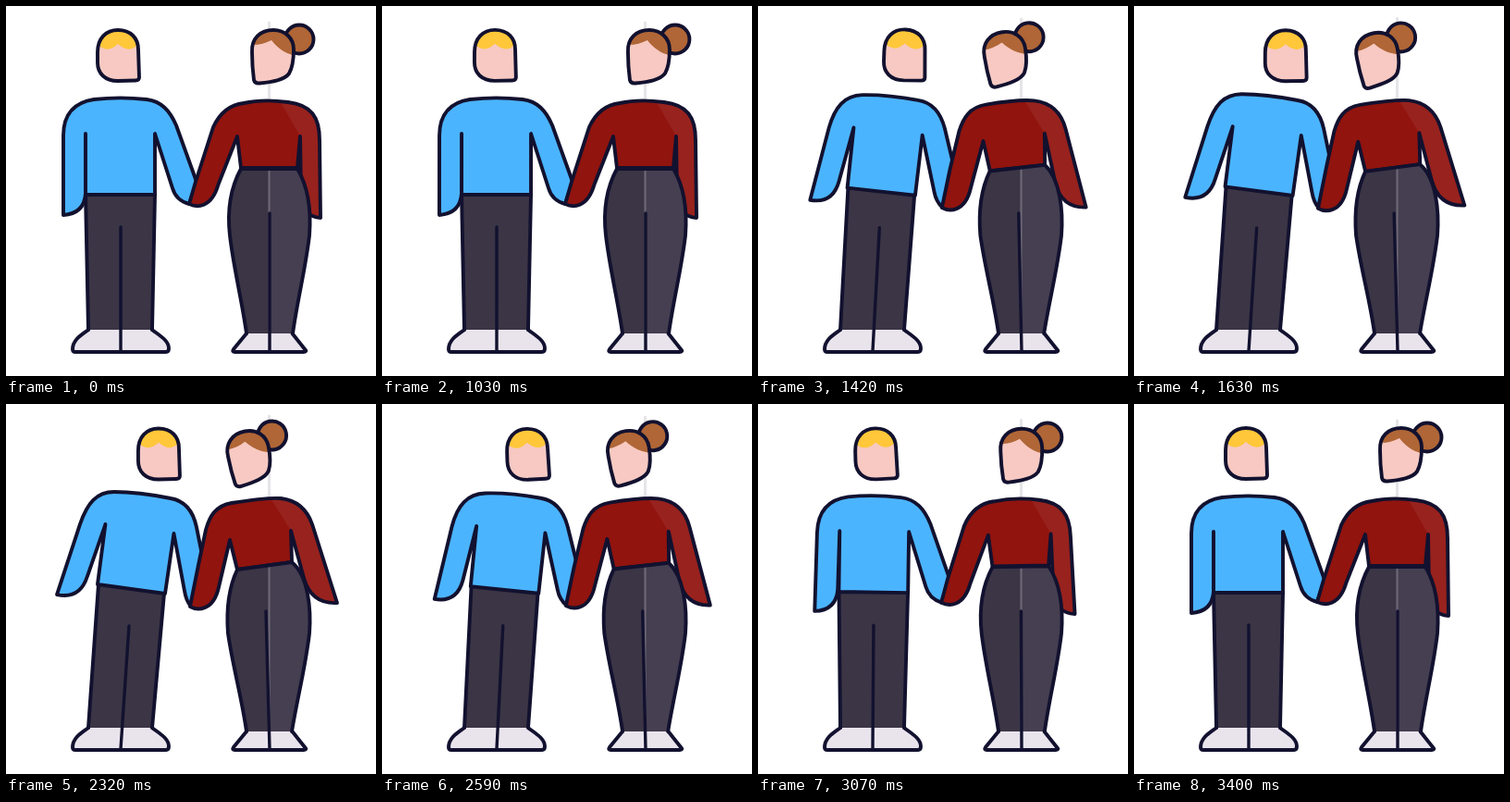
An HTML page with a canvas that plays this animation: 400 by 400 pixels, repeating every 3.43 s.

```html
<!DOCTYPE html>
<html>
<head>
<meta charset="utf-8">
<style>
html, body { margin: 0; width: 100%; height: 100%; overflow: hidden; background: #fff; }
canvas { display: block; width: 100vmin; height: 100vmin; }
</style>
</head>
<body>
<canvas id="stage"></canvas>
<script>
const LOOP = 3430, LEAN = [1000, 1860], BACK = [2290, 3400];
const INK = '#12112f', SHOE = '#e9e4ec', SKIN = '#f7c9c2', BROWN = '#b06636';
const PANTS = '#3b3545', PANTS_LIT = '#453f51';
const OUTLINE = 3.9, SEAM = 3.4;

const canvas = document.getElementById('stage');
const ctx = canvas.getContext('2d');

// Each pair holds the upright and the leaning version of a shape.
const man = {
  pants: ['M86,204 L89,350 L158,350 L161,204',
          'M100,195 L89,350 L158,350 L171,205'],
  seam: ['M124,239 L124,373', 'M133,240 L124,373'],
  top: ['M62,226 L62,140 C62,116 75,104 95,101 C113,99 134,99 152,101 C168,103 177,113 184,129 L206,190 L198,214 C190,212 183,207 180,197 L161,138 L161,204 L86,204 L86,138 L86,203 C85,217 77,225 62,226 Z',
        'M55,206 L80,130 C88,107 98,95 117,95 C137,95 158,98 178,102 C196,105 203,119 206,133 L215,178 L200,219 C196,214 194,209 193,202 L181.5,140 L172,205 L99,195 L107.5,130 L88,186 C83,202 73,210 55,206 Z'],
  shoes: 'M89,350 C84,354 72,360 72,371 Q72,374 75,374 L173,374 Q176,374 176,370 C176,361 164,355 158,350',
  head: 'M99,50 C99,35 108,26 121,26 C135,26 143,35 143,47 L144,77 Q144,80.5 140,80.5 L121,81 C107,81 99,73 99,61 Z',
  hair: 'M99,41 C101,32 109,26 121,26 C134,26 142,34 143,41 C137,48 130,49 121,41 C113,49 105,48 99,41 Z'
};

const woman = {
  pants: ['M254,176 C242,198 239,222 242,248 C246,283 255,318 260,354 L310,354 C315,318 324,283 328,248 C330,222 327,196 315,176 Z',
          'M250,179 C240,200 238,222 240,248 C245,283 255,318 260,354 L309,354 C315,318 324,283 328,248 C330,222 327,186 309,171 Z'],
  lit: ['M285,176 L285,354 L310,354 C315,318 324,283 328,248 C330,222 327,196 315,176 Z',
        'M285,175 L285,354 L309,354 C315,318 324,283 328,248 C330,222 327,186 309,171 Z'],
  seam: ['M285,224 L285,373', 'M281,224 L285,373'],
  guide: ['M284.5,18 L284.5,104', 'M284.5,13 L284.5,104'],
  top: ['M198,214 C206,218 222,219 229.5,193 L250,141 L254,175 L315,175 L318,141 L319,206 C321,221 327,228 340,229 L339,145 C339,120 330,107 305,104 C290,102 270,102 257,105 C240,107 230,118 224,131 L205,190 Z',
        'M199,219 C206,223 224,225 230,198 L242,147 L250,179 L309,171 L308,137 L322,188 C327,206 338,216 358,215 L331,130 C325,113 314,104 297,102 C283,101 263,104 244,107 C226,110 220,122 216,136 L208,174 Z'],
  sleeve: ['M297,104 L318,141 L319,206 C321,221 327,228 340,229 L339,145 C339,120 330,107 305,104 Z',
           'M286,102 L308,137 L322,188 C327,206 338,216 358,215 L331,130 C325,113 314,104 297,102 Z'],
  shoes: 'M260,354 L246,371 Q244,374 247,374 L322,374 Q326,374 323,371 L309.5,354',
  head: 'M266,50 C265,35 275,26 289,26 C302,26 311,35 311,47 C311,58 310,66 306,73 C301,80 288,82 274,83.5 Q269,84 268,80 Q266,65 266,50 Z',
  hair: 'M267,42 C270,31 278,26 289,26 C302,26 311,35 311,47 L310,53 C302,51 294,46 287,37 C281,40 274,42 267,42 Z',
  bun: 'M332.5,36 A15.5,15.5 0 1 1 301.5,36 A15.5,15.5 0 1 1 332.5,36 Z'
};

const NUM = /-?\d+(\.\d+)?/g;

function morph([from, to], k) {
  const ends = to.match(NUM);
  let i = 0;
  return from.replace(NUM, n => +n + (ends[i++] - n) * k);
}

function fill(d, color) {
  ctx.fillStyle = color;
  ctx.fill(new Path2D(d));
}

function line(d, color = INK, width = OUTLINE) {
  ctx.strokeStyle = color;
  ctx.lineWidth = width;
  ctx.stroke(new Path2D(d));
}

function shape(d, color) {
  fill(d, color);
  line(d);
}

function bezier(x1, y1, x2, y2) {
  const at = (a, b, s) => 3 * (1 - s) * (1 - s) * s * a + 3 * (1 - s) * s * s * b + s * s * s;
  return u => {
    if (u <= 0 || u >= 1) return u <= 0 ? 0 : 1;
    let lo = 0, hi = 1;
    for (let i = 0; i < 24; i++) {
      const mid = (lo + hi) / 2;
      if (at(x1, x2, mid) < u) lo = mid; else hi = mid;
    }
    return at(y1, y2, lo);
  };
}

const leanBody = bezier(.4, 0, .1, 1), leanHead = bezier(.5, .3, .1, 1);
const backMan = bezier(.33, 0, .42, 1), backSoft = bezier(.4, 0, .5, 1);

// Draws around pivot (x, y), moved by (dx, dy) and turned by deg.
function posed(x, y, dx, dy, deg, paint) {
  ctx.save();
  ctx.translate(x + dx, y + dy);
  ctx.rotate(deg * Math.PI / 180);
  ctx.translate(-x, -y);
  paint();
  ctx.restore();
}

function drawMan(k, head, leaning) {
  const pants = morph(man.pants, k);
  fill(pants, PANTS);
  fill(man.shoes, SHOE);
  line(pants.replace(/ L158,350/, ' M158,350'));
  line(man.shoes);
  line(morph(man.seam, k), INK, SEAM);
  shape(morph(man.top, k), '#4bb4ff');

  const swing = Math.sin(Math.PI * head);
  const bob = head * .5 + swing * (leaning ? -2.2 : .8);
  posed(121, 53, 44 * head, bob, swing * (leaning ? 4.5 : -3.5), () => {
    fill(man.head, SKIN);
    fill(man.hair, '#ffc739');
    line(man.head);
  });
}

function drawWoman(k, leaning) {
  line(morph(woman.guide, k), '#e5e5e9', 3);
  const top = morph(woman.top, k), pants = morph(woman.pants, k);
  fill(top, '#91140e');
  fill(morph(woman.sleeve, k), '#98221d');
  line(top);
  fill(pants, PANTS);
  fill(morph(woman.lit, k), PANTS_LIT);
  line('M284.5,177 L284.5,354', '#706a79', 2);
  fill(woman.shoes, SHOE);
  line(pants.replace(/ L(3[\d.]+,354)/, ' M$1').replace('Z', `L${pants.match(/^M(\S+)/)[1]}`));
  line(woman.shoes);
  line(morph(woman.seam, k), INK, SEAM);

  const bob = 3.2 * k + Math.sin(Math.PI * k) * (leaning ? -1 : .7);
  posed(288, 54, -25.5 * k, bob, -11 * k, () => {
    shape(woman.bun, BROWN);
    fill(woman.head, SKIN);
    fill(woman.hair, BROWN);
    line(woman.head);
  });
}

function draw(now) {
  const t = now % LOOP;
  const size = Math.round(Math.min(innerWidth, innerHeight) * devicePixelRatio);
  if (canvas.width !== size) canvas.width = canvas.height = size;
  ctx.setTransform(size / 400, 0, 0, size / 400, 0, 0);
  ctx.fillStyle = '#fff';
  ctx.fillRect(0, 0, 400, 400);
  ctx.lineCap = ctx.lineJoin = 'round';

  const leaning = t < BACK[0];
  const [start, end] = leaning ? LEAN : BACK;
  const u = (t - start) / (end - start);
  const body = leaning ? leanBody(u) : 1 - backMan(u);
  const head = leaning ? leanHead(u) : 1 - backSoft(u);
  drawMan(body, head, leaning);
  drawWoman(leaning ? body : head, leaning);
}

let origin;
function tick(now) {
  origin ??= now;
  draw(now - origin);
  requestAnimationFrame(tick);
}
draw(0);
requestAnimationFrame(tick);
</script>
</body>
</html>
```
